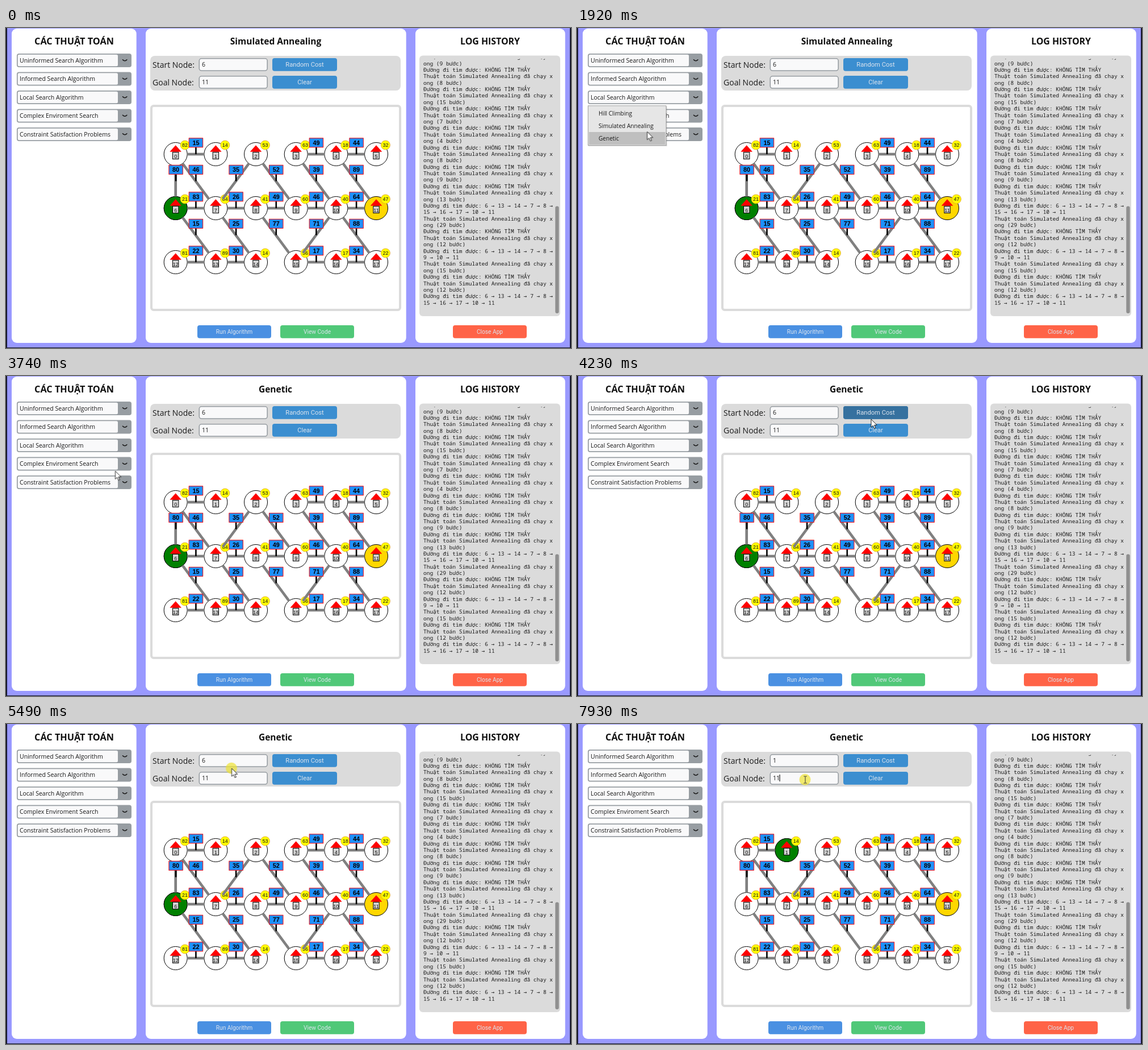
These frames come from a looping animation (995x563 px, 8000 ms). An HTML page:

```html
<!DOCTYPE html>
<html lang="vi">
<head>
<meta charset="utf-8">
<title>Search algorithms</title>
<style>
html, body { margin: 0; width: 100%; height: 100%; overflow: hidden; background: #15172b; }
svg { display: block; width: 995px; height: 563px; }
.ui { font: 10.55px "Open Sans", "Noto Sans", sans-serif; fill: #1a1a1a; }
.title { font: bold 15.5px "Open Sans", "Noto Sans", sans-serif; fill: #111; }
.label { font: 14px "Open Sans", "Noto Sans", sans-serif; fill: #1a1a1a; }
.btn { font: 10.2px Roboto, sans-serif; fill: #dce4ee; }
.log { font: 9.5px "Noto Sans Mono", "DejaVu Sans Mono", monospace; fill: #1a1a1a; white-space: pre; }
.arrow { font-family: "DejaVu Sans Mono", monospace; }
.num { font: 9px "Liberation Sans", Arial, sans-serif; fill: #111; }
.cost { font: bold 10.8px "Liberation Sans", Arial, sans-serif; fill: #000; }
.mid { text-anchor: middle; }
</style>
</head>
<body>
<svg id="stage" viewBox="0 0 995 563"></svg>
<script>
const NS = 'http://www.w3.org/2000/svg';
const LOOP = 8000;
const stage = document.getElementById('stage');

function add(tag, attrs, parent = stage) {
  const el = document.createElementNS(NS, tag);
  for (const k in attrs) el.setAttribute(k, attrs[k]);
  return parent.appendChild(el);
}
const box = (x, y, x2, y2, fill, rx = 0, parent = stage, more = {}) =>
  add('rect', { x, y, width: x2 - x, height: y2 - y, rx, fill, ...more }, parent);
const line = (x1, y1, x2, y2, stroke, w) =>
  add('line', { x1, y1, x2, y2, stroke, 'stroke-width': w });
const disc = (cx, cy, r, fill, parent = stage, more = {}) =>
  add('circle', { cx, cy, r, fill, ...more }, parent);
const outline = (stroke, w = 1) => ({ stroke, 'stroke-width': w });
function text(str, x, y, cls, parent = stage, size = 0) {
  const el = add('text', { x, y, class: cls }, parent);
  if (size) el.style.fontSize = size + 'px';
  el.textContent = str;
  return el;
}

// Visible only inside the given [from, to] spans (ms).
function show(el, ...spans) {
  const frames = [{ offset: 0, opacity: 0 }];
  for (const [from, to] of spans) {
    if (from === 0) frames[0].opacity = 1;
    else frames.push({ offset: from / LOOP, opacity: 1 });
    if (to < LOOP) frames.push({ offset: to / LOOP, opacity: 0 });
  }
  frames.push({ offset: 1, opacity: frames[frames.length - 1].opacity });
  for (const f of frames) f.easing = 'steps(1, end)';
  el.animate(frames, { duration: LOOP, iterations: Infinity });
  return el;
}

// Window and panels
box(2, 0, 993, 562, '#9999ff');
for (const [x, x2] of [[10, 229.7], [246, 704.7], [721, 984.7]]) box(x, 1, x2, 554, '#fff', 9);

text('CÁC THUẬT TOÁN', 120, 28.6, 'title mid', stage, 16.3);
text('LOG HISTORY', 852.5, 28.6, 'title mid', stage, 15.9);
show(text('Simulated Annealing', 475, 28.6, 'title mid'), [0, 3200]);
show(text('Genetic', 474.5, 28.6, 'title mid'), [3200, LOOP]);

// Left column
['Uninformed Search Algorithm', 'Informed Search Algorithm', 'Local Search Algorithm',
  'Complex Enviroment Search', 'Constraint Satisfaction Problems'].forEach((name, i) => {
  const y = 57 + i * 32.5;
  box(19, y - 12, 221, y + 12, '#979da2', 4);
  box(20.7, y - 10.3, 197, y + 10.3, '#f9f9fa', 2.5);
  add('path', { d: `M205.5 ${y - 1.2}q3.7 4 7.4 0`, fill: 'none', 'stroke-linecap': 'round',
    ...outline('#1a1a1a', 1.6) });
  text(name, 24, y + 3.8, 'ui');
});

// Form
box(254, 49, 695, 110, '#dbdbdb', 8);
text('Start Node:', 258, 70, 'label');
text('Goal Node:', 258, 101, 'label');

function button(x, y, w, fill, str, size, hover, span) {
  box(x, y, x + w, y + 22.7, fill, 4);
  if (hover) show(box(x, y, x + w, y + 22.7, hover, 4), span);
  text(str, x + w / 2, y + 15, 'btn mid', stage, size);
}
for (const y of [53, 84])
  box(340.3, y + 0.8, 460.2, y + 22, '#f9f9fa', 4, stage, outline('#979da2', 1.6));
button(469, 53, 114, '#3b8ed0', 'Random Cost', 11.2, '#36719f', [4160, 4300]);
button(469, 84, 114, '#3b8ed0', 'Clear', 11, '#36719f', [4370, 4440]);
button(337, 523, 130, '#4a90e2', 'Run Algorithm');
button(483, 523, 130, '#50c878', 'View Code');
button(787, 523, 130, '#ff6347', 'Close App');

show(text('6', 345, 68, 'ui'), [0, 6570]);
show(text('1', 345, 68, 'ui'), [6770, LOOP]);
text('11', 345, 99, 'ui');
const caret = (x, y) => line(x, y - 6, x, y + 6, '#111', 1.2);
show(caret(351, 64), [6040, 6570], [6770, 7460], [7800, 7930]);
show(caret(346, 64), [6570, 6770]);
show(caret(357, 95), [7930, LOOP]);

// Graph: 3 rows of 6 nodes
box(256, 137, 694, 496, '#fff', 4, stage, outline('#dbdbdb', 4));
const R = 20.5;
const at = (row, col) => [298.7 + col * 70.66, 222 + row * 95];

const hints = '82 14 53 63 18 32 21 84 41 60 40 47 81 89 14 56 17 22'.split(' ');
hints.forEach((hint, n) => {
  const [x, y] = at(Math.floor(n / 6), n % 6);
  const ring = outline('#000');
  disc(x, y, R, n === 11 ? '#ffd700' : '#fff', stage, ring);
  if (n === 6) show(disc(x, y, R, '#008000', stage, ring), [0, 6640]);
  if (n === 1) show(disc(x, y, R, '#008000', stage, ring), [6840, LOOP]);
  add('path', { d: `M${x - 10.3} ${y - 4.2}l10.3 -11.6l10.3 11.6z`, fill: '#f00' });
  box(x - 5.2, y - 3.5, x + 5.2, y + 8.6, '#d3d3d3', 0, stage, ring);
  text(n, x, y + 7.3, 'num mid');
  disc(x + 16.4, y - 16, 8, '#ff0', stage, outline('#e0a030', 0.8));
  text(hint, x + 16.4, y - 12.8, 'num mid');
});

// One slot per column gap; "/" marks a rising edge, "-" no edge.
const edges = [[at(0, 0), at(1, 0), '80']];
const addEdges = (row, drop, slots) => slots.split(' ').forEach((slot, col) => {
  if (slot === '-') return;
  const up = slot[0] === '/';
  edges.push([at(row + (up ? drop : 0), col), at(row + (up ? 0 : drop), col + 1), slot.replace('/', '')]);
});
addEdges(0, 0, '15 - - 49 44');
addEdges(0, 1, '46 /35 52 39 89');
addEdges(1, 0, '83 26 49 46 64');
addEdges(1, 1, '15 25 77 /71 88');
addEdges(2, 0, '22 30 - 17 34');

for (const [[x, y], [x2, y2]] of edges) {
  const k = R / Math.hypot(x2 - x, y2 - y);
  const dx = (x2 - x) * k, dy = (y2 - y) * k;
  line(x + dx, y + dy, x2 - dx, y2 - dy, '#808080', 4.7);
}
for (const [[x, y], [x2, y2], cost] of edges) {
  const mx = (x + x2) / 2 + 0.4, my = (y + y2) / 2;
  line(mx, my - 12, mx, my, '#000', 2.6);
  box(mx - 12.2, my - 28.2, mx + 12.2, my - 12.2, '#1e90ff', 0, stage, outline('#f00'));
  text(cost, mx, my - 16.3, 'cost mid');
}

// Log
box(728, 48.5, 976, 507, '#dbdbdb', 6);
box(967.3, 313.5, 973.7, 502, '#8f8f8f', 3);
const clip = add('clipPath', { id: 'logClip' });
box(730, 54.3, 966, 503, '#000', 0, clip);
const log = add('g', { 'clip-path': 'url(#logClip)' });

function logRow(str, i) {
  const row = text('', 735, 54.2 + i * 11.38, 'log', log);
  for (const part of str.split(/(→)/))
    add('tspan', part === '→' ? { class: 'arrow' } : {}, row).textContent = part;
}
const viaEnd = '15 → 16 → 17 → 10 → 11';
const viaRow = '9 → 10 → 11';
const runs = [[9], [8], [15], [7], [4], [8], [9], [13, viaEnd], [29], [12, viaRow], [15], [12, viaEnd]];
runs.flatMap(([count, tail]) => [
  'Thuật toán Simulated Annealing đã chạy x',
  `ong (${count} bước)`,
  'Đường đi tìm được: ' + (tail ? '6 → 13 → 14 → 7 → 8 →' : 'KHÔNG TÌM THẤY'),
  ...(tail ? [tail] : [])
]).forEach(logRow);

// Drop-down menu
const menu = show(add('g', {}), [1360, 3200]);
box(20, 138, 158.5, 208, 'rgba(0,0,0,.18)', 0, menu);
box(19.5, 136.8, 157, 206.3, '#e6e6e6', 0, menu, outline('#a0a0a0'));
const bar = y => box(21, y, 155.5, y + 22, '#bfbfbf', 0, menu);
show(bar(161), [1740, 1920]);
show(bar(183), [1920, 3200]);
['Hill Climbing', 'Simulated Annealing', 'Genetic'].forEach((name, i) =>
  text(name, 38, 153.8 + i * 22, 'ui', menu, 10.1));

// Pointer moves: [from, to, x, y], resting in between
const moves = [
  [130, 750, 184, 70], [950, 1290, 205, 113], [1360, 2060, 116.5, 188.5],
  [3530, 4230, 518, 76], [4370, 4700, 482, 268], [4700, 5140, 425, 81],
  [5140, 5490, 397.5, 78], [5490, 5770, 388, 63], [7320, 7530, 401, 92], [7800, 7930, 402, 98]
];
const pose = (t, x, y) => ({ offset: t / LOOP, transform: `translate(${x}px, ${y}px)`, easing: 'ease-in-out' });
let spot = [946, 555];
const path = [pose(0, ...spot)];
for (const [from, to, ...next] of moves) {
  path.push(pose(from, ...spot), pose(to, ...next));
  spot = next;
}
path.push(pose(LOOP, ...spot));

const pointer = add('g', {});
show(disc(-0.5, -0.3, 10, 'rgba(238,226,50,.7)', pointer),
  [1290, 1430], [3050, 3200], [5490, 5560], [5970, 6040], [7930, LOOP]);
show(add('path', { d: 'M0 0v14.2l3.3 -3l2.3 5.2l2.3 -1l-2.3 -5.1h4.5z', fill: '#fff',
  'stroke-linejoin': 'round', ...outline('#111', 0.9) }, pointer), [130, 5600], [7395, 7495]);
show(add('path', { d: 'M-2.7 -6h2l.7 .6l.7 -.6h2M0 -5.4v10.8M-2.7 6h2l.7 -.6l.7 .6h2',
  fill: 'none', ...outline('#333') }, pointer), [5600, 7395], [7495, LOOP]);
pointer.animate(path, { duration: LOOP, iterations: Infinity });
</script>
</body>
</html>
```
